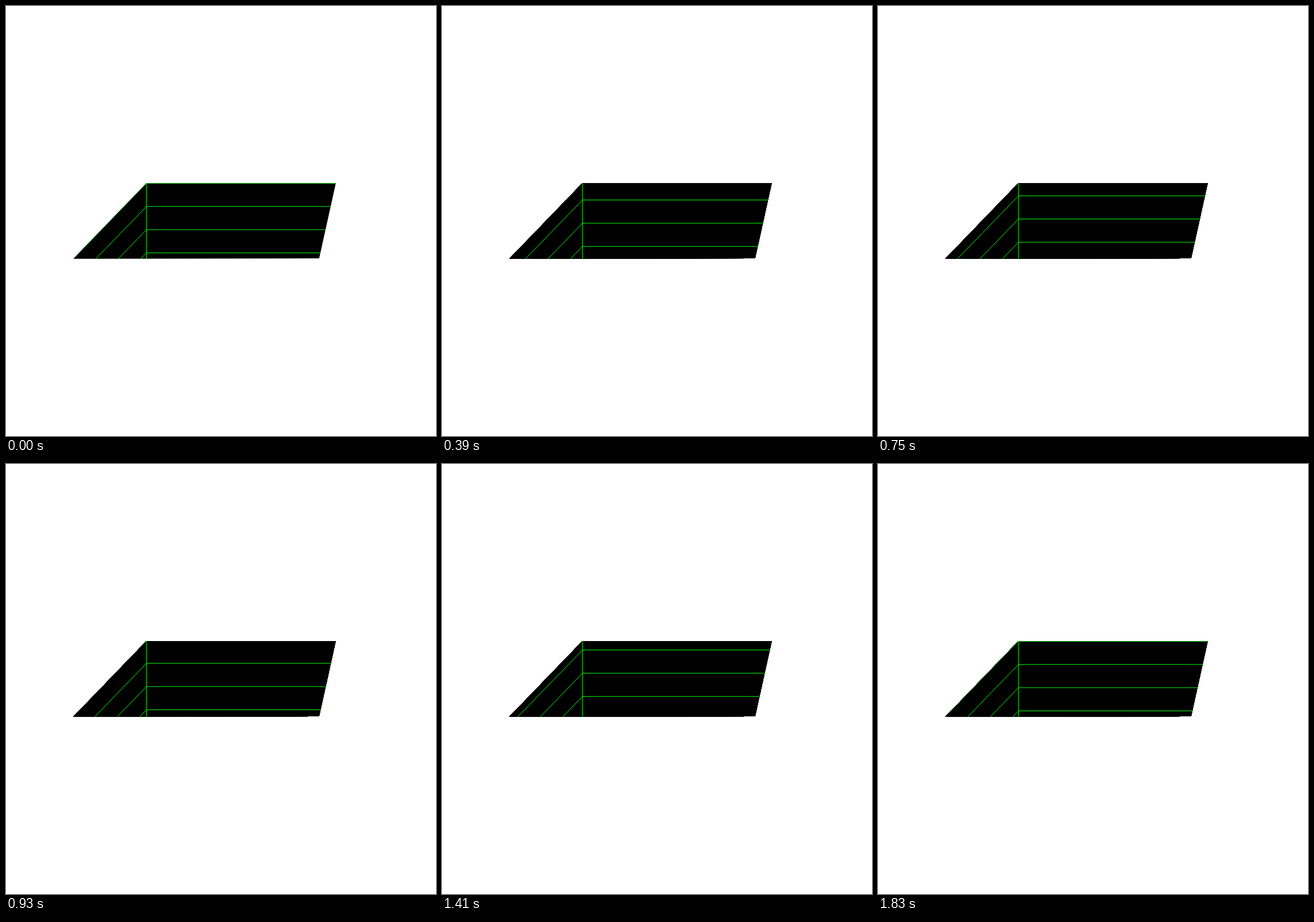
These frames come from a looping animation (748 by 748 pixels, 1.86 s). An HTML page with a canvas:

```html
<!DOCTYPE html>
<html>
<head>
<meta charset="utf-8">
<style>
html, body { margin: 0; height: 100%; overflow: hidden; background: #fff; }
canvas { display: block; }
</style>
</head>
<body>
<canvas id="stage" width="748" height="748"></canvas>
<script>
const ctx = document.getElementById('stage').getContext('2d');
const STEP = 30, LOOP = 1860, GAP = 40.4;
const TOP = 308.3, CORNER = 244.3, SLOPE = 1.032;

function path(points) {
  ctx.beginPath();
  for (const [x, y] of points) ctx.lineTo(x, y);
}

// Window through which the scrolling walls are seen
path([[117.3, 439.5], [244.3, 308], [573.6, 308], [544.6, 439]]);
ctx.clip();
ctx.strokeStyle = '#0f0';

function draw(time) {
  const step = Math.floor((time % LOOP) / STEP);
  // Six rows pass in 61 steps, so the last step equals the first
  const shift = GAP * ((61 * 6 - 6 * step) % 61) / 61;

  ctx.fillStyle = '#000';
  ctx.fillRect(0, 0, 748, 748);
  path([[CORNER, 300], [CORNER, 450]]);
  ctx.stroke();
  for (let row = -1; row < 4; row++) {
    const y = TOP + shift + row * GAP;
    path([[CORNER - 150, y + 150 * SLOPE], [CORNER, y], [600, y]]);
    ctx.stroke();
  }
}

const start = performance.now();
function tick() {
  draw(performance.now() - start);
  requestAnimationFrame(tick);
}
tick();
</script>
</body>
</html>
```
